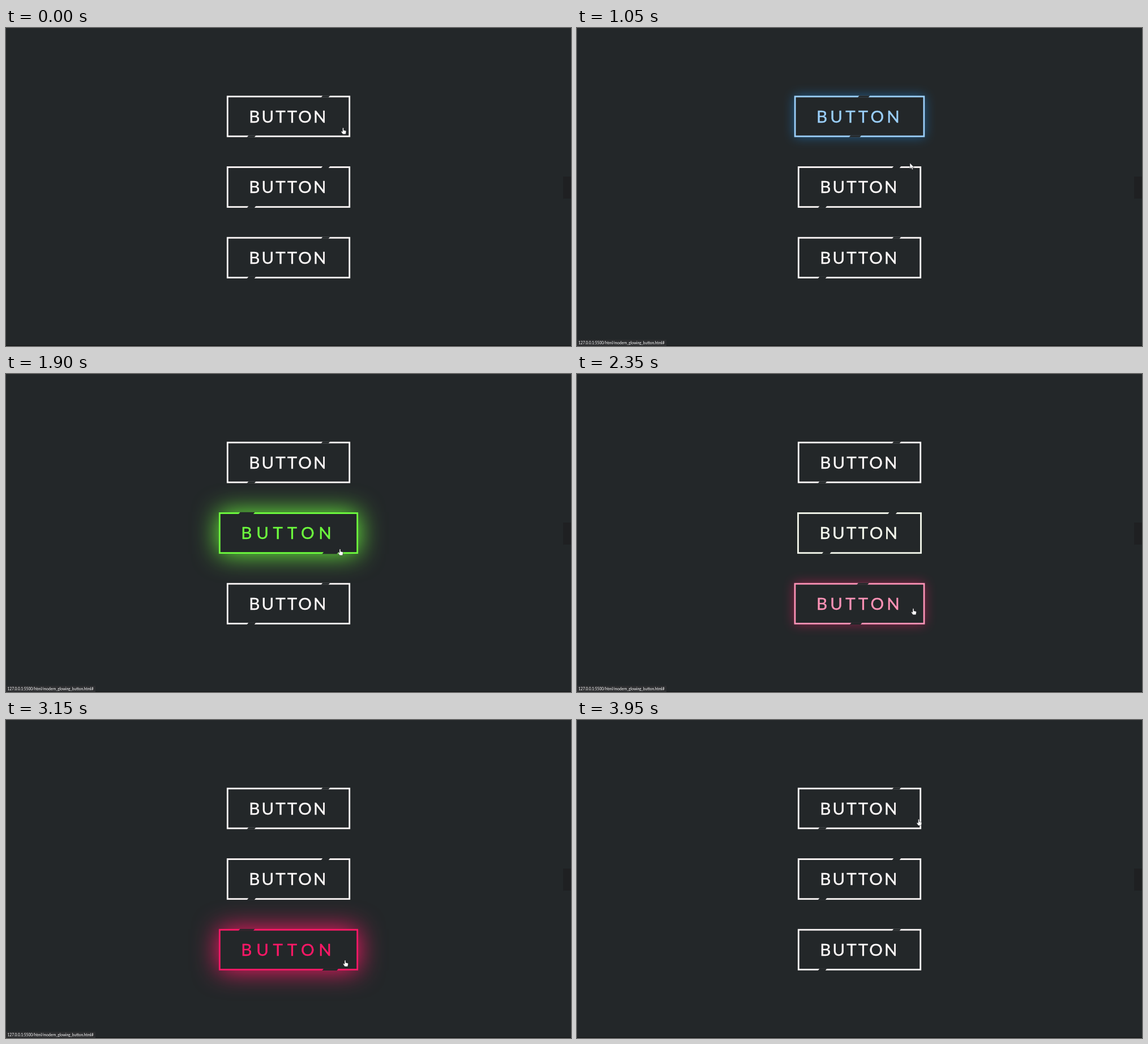
Animation of 998 by 561 pixels, one loop 4000 ms. Source, as an HTML page:

```html
<!DOCTYPE html>
<html lang="en">
<head>
<meta charset="utf-8">
<title>Glowing buttons</title>
<style>
  html, body { margin: 0; width: 100%; height: 100%; overflow: hidden; background: #232729; }
  svg { display: block; width: 100%; height: 100%; }
  text { font-family: Lato, sans-serif; }
</style>
</head>
<body>
<svg id="stage" viewBox="0 0 998 561">
  <rect width="998" height="561" fill="#232729"/>
  <rect x="984" y="262" width="14" height="39" fill="#1f2022"/>
  <rect y="560" width="998" height="1" fill="#111314"/>
  <g id="buttons"></g>
  <g id="status">
    <rect y="550" width="158" height="11" fill="#2d2e30"/>
    <text x="2.5" y="558" font-size="6.6" fill="#fff">127.0.0.1:5500/html/modern_glowing_button.html#</text>
  </g>
  <g id="cursor" fill="#fff" stroke="#15171a" stroke-width=".5" stroke-linejoin="round">
    <path id="hand" d="M-1 .6Q0-.6 1 .6V4.3L4.6 5.2Q5.7 5.7 5.4 7L4.6 11.2H-.6L-3.4 7.2Q-3.6 5.7-2.4 5.9L-1 7Z"/>
    <path id="arrow" d="M0 0V10.5L2.4 8.2 4 11.8 5.6 11.1 4.1 7.6H7.4Z"/>
  </g>
</svg>
<script>
const LOOP = 4000, FADE = 500, CENTER = 499, EM = 31, FONT_SIZE = 29.5;
const HALF_W = 107.7, HALF_H = 35.1, BORDER = 2.8, BLUR = 22.5;
const BACK = '#232729', WHITE = [255, 250, 250];
const $ = id => document.getElementById(id);
const clamp = v => Math.min(1, Math.max(0, v));
const mix = (a, b, p) => a + (b - a) * p;

function make(parent, tag, attrs) {
  const node = document.createElementNS('http://www.w3.org/2000/svg', tag);
  set(node, attrs);
  return parent.appendChild(node);
}

function set(node, attrs) {
  for (const key in attrs) node.setAttribute(key, attrs[key]);
}

// CSS "ease": cubic-bezier(.25, .1, .25, 1)
function ease(x) {
  if (x <= 0 || x >= 1) return clamp(x);
  const bezier = (a, b, s) => 3 * a * s * (1 - s) ** 2 + 3 * b * s * s * (1 - s) + s ** 3;
  let lo = 0, hi = 1;
  for (let i = 0; i < 24; i++) {
    const mid = (lo + hi) / 2;
    if (bezier(.25, .25, mid) < x) lo = mid; else hi = mid;
  }
  return bezier(.1, 1, lo);
}

const buttons = [
  { y: 156, color: [30, 155, 255], enter: 10, leave: 890 },
  { y: 280.6, color: [110, 255, 62], enter: 1075, leave: 2000 },
  { y: 405.2, color: [255, 24, 103], enter: 2215, leave: 3310 }
];

buttons.forEach((b, i) => {
  const g = make($('buttons'), 'g', { transform: `translate(${CENTER} ${b.y})` });
  const filter = make(g, 'filter', {
    id: 'glow' + i, filterUnits: 'userSpaceOnUse', x: -230, y: -140, width: 460, height: 280,
    'color-interpolation-filters': 'sRGB'
  });
  b.blur = make(filter, 'feGaussianBlur', { stdDeviation: 0 });
  b.glow = make(g, 'rect', { fill: `rgb(${b.color})`, filter: `url(#glow${i})` });
  b.frame = make(g, 'rect', { fill: BACK, 'stroke-width': BORDER });
  b.gaps = [-1, 1].map(() => make(g, 'rect', { fill: BACK, height: 3.4, y: -1.7 }));
  b.label = make(g, 'text', {
    y: 10.8, 'font-size': FONT_SIZE, 'text-anchor': 'middle', 'stroke-width': .4
  });
  b.label.textContent = 'BUTTON';
});

function drawButton(b, t) {
  const p = ease((t - b.enter) / FADE) - ease((t - b.leave) / FADE);
  const half = HALF_W + 6 * .15 * EM / 2 * p;
  const box = pad => ({
    x: -half - pad, y: -HALF_H - pad, width: 2 * (half + pad), height: 2 * (HALF_H + pad)
  });
  const color = `rgb(${WHITE.map((c, i) => Math.round(mix(c, b.color[i], p)))})`;
  set(b.blur, { stdDeviation: Math.max(.01, BLUR * p) });
  set(b.glow, { ...box(BORDER / 2), opacity: p });
  set(b.frame, { ...box(0), stroke: color });
  b.gaps.forEach((gap, i) => {
    const side = i ? 1 : -1, width = mix(13, 26, p);
    const x = -side * mix(.6, -.6, p) * (half + BORDER / 2);
    set(gap, {
      x: -width / 2, width,
      transform: `translate(${x} ${side * HALF_H}) skewX(-40)`
    });
  });
  set(b.label, { fill: color, stroke: color, 'letter-spacing': mix(.1, .25, p) * EM });
}

// Pointer tip: time, x, y
const path = [
  [0, 595.5, 176], [250, 589.5, 177.5], [600, 588.5, 177.5], [750, 588, 180],
  [890, 588, 192], [1075, 588, 245], [1300, 589, 299.5], [1600, 590, 308],
  [1900, 590, 308.7], [2000, 590, 317], [2215, 592, 369], [2350, 594, 413.5],
  [2600, 598, 423], [3150, 599, 423.7], [3310, 621, 417], [3500, 660, 340],
  [3700, 655, 240], [3850, 631, 179], [3950, 603.7, 175], [4000, 595.5, 176]
];

// Monotone cubic interpolation of one coordinate
function along(t, axis) {
  const last = path.length - 1;
  let i = 0;
  while (i < last - 1 && t >= path[i + 1][0]) i++;
  const rate = k => (path[k + 1][axis] - path[k][axis]) / (path[k + 1][0] - path[k][0]);
  const slope = k => {
    if (k === 0) return rate(0);
    if (k === last) return rate(last - 1);
    const a = rate(k - 1), b = rate(k);
    return a * b > 0 ? 2 * a * b / (a + b) : 0;
  };
  const span = path[i + 1][0] - path[i][0], s = (t - path[i][0]) / span;
  const s2 = s * s, s3 = s2 * s;
  return (2 * s3 - 3 * s2 + 1) * path[i][axis] + (s3 - 2 * s2 + s) * span * slope(i)
    + (3 * s2 - 2 * s3) * path[i + 1][axis] + (s3 - s2) * span * slope(i + 1);
}

function draw(t) {
  buttons.forEach(b => drawButton(b, t));
  set($('status'), { opacity: clamp((t - 60) / 120) - clamp((t - 3450) / 200) });
  const hovering = t < 10 || t > 3930 || buttons.some(b => t >= b.enter && t < b.leave);
  set($('cursor'), { transform: `translate(${along(t, 1)} ${along(t, 2)})` });
  set($('hand'), { opacity: hovering ? 1 : 0 });
  set($('arrow'), { opacity: hovering ? 0 : 1 });
}

const start = performance.now();
function tick() {
  draw((performance.now() - start) % LOOP);
  requestAnimationFrame(tick);
}
tick();
</script>
</body>
</html>
```
